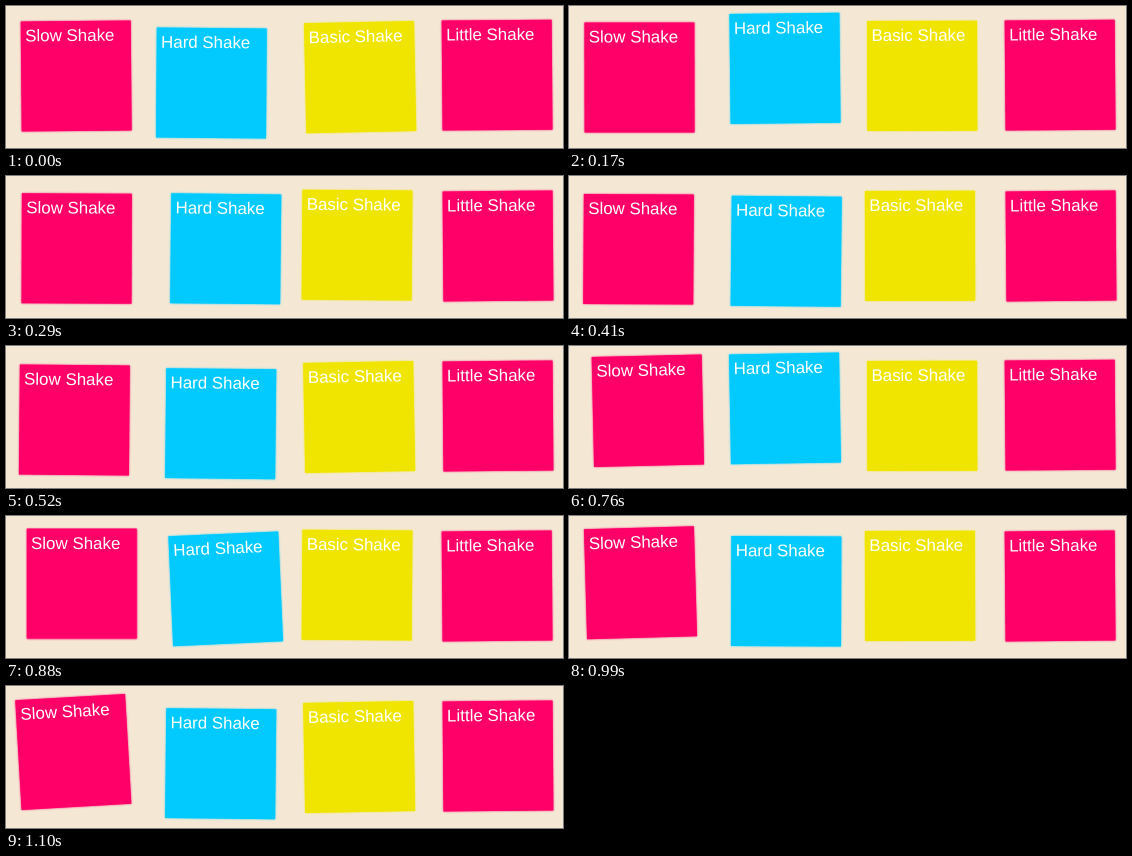
Recreate the animation shown at these times as an HTML page. Size 557x142 px, loop 1150 ms.

```html
<!DOCTYPE html>
<html lang="en">
<head>
<meta charset="utf-8">
<title>Shake</title>
<style>
  html, body {
    margin: 0;
    width: 100%;
    height: 100%;
    overflow: hidden;
    background: #f4e8d5;
  }
  .box {
    --fill: #ff0068;
    position: absolute;
    left: -55px;
    top: -55px;
    box-sizing: border-box;
    width: 110px;
    height: 110px;
    padding: 4.8px 4.4px;
    color: #fff;
    background: var(--fill);
    box-shadow: 0 0 2px var(--fill);
    font: 16.9px "Liberation Sans", Arial, sans-serif;
    text-rendering: geometricPrecision;
    white-space: nowrap;
  }
  .blue { --fill: #02caff; }
  .yellow { --fill: #f0e500; }
</style>
</head>
<body>
<div class="box">Slow Shake</div>
<div class="box blue">Hard Shake</div>
<div class="box yellow">Basic Shake</div>
<div class="box">Little Shake</div>
<script>
  const LOOP = 1150;
  const STEPS = 20;
  const CYCLE = 10;  // steps after which the faster shakes repeat

  // Key points: step, centre x, centre y, degrees.
  const slowPath = [
    [0, 70.2, 70, -.5], [5, 70.7, 72.5, .2], [9, 68.4, 74, .5],
    [11, 82, 62, -2.5], [15, 75.7, 67.5, 0], [19, 67.3, 66, -3.3]
  ];
  const hardPath = [
    [0, 205.4, 77, .4], [1, 213.8, 62.3, .5], [3, 216, 62.4, -.6],
    [5, 219.7, 72.8, .6], [9, 214.7, 77.7, .6]
  ];

  const wave = turns => Math.cos(turns * 2 * Math.PI);

  function along(path, step) {
    const next = path.findIndex(point => point[0] >= step);
    const b = path[next];
    const a = path[Math.max(next - 1, 0)];
    const mix = (step - a[0]) / (b[0] - a[0] || 1);
    return a.map((value, i) => value + (b[i] - value) * mix).slice(1);
  }

  // Every second beat is knocked off its path.
  function rattle(pose, step, size) {
    if (step % 2) return pose;
    return pose.map((value, i) =>
      value + Math.sin(step * (2.3 + i)) * size * (i < 2 ? 1 : .3));
  }

  function slow(step) {
    return rattle(along(slowPath, step), step, 1);
  }

  function hard(step) {
    const [x, y, angle] = along(hardPath, step % CYCLE);
    const twist = 3.1 * Math.exp(-((step - 15) ** 2) / 2);
    return rattle([x, y, angle - twist], step, 5);
  }

  function basic(step) {
    const turns = step / CYCLE;
    const pose = [
      352.6 + 1.9 * wave(turns - .1),
      70.2 + wave(turns),
      -.4 - .8 * wave(turns)
    ];
    return rattle(pose, step, 1);
  }

  function little(step) {
    const right = wave((step - 7.6) / 14.5) > 0;
    const down = step % CYCLE >= CYCLE / 2;
    return [right ? 492 : 491.1, down ? 70 : 69.1, -.45];
  }

  const boxes = document.querySelectorAll(".box");
  const shakes = [slow, hard, basic, little];
  const begin = performance.now();

  function draw() {
    const time = (performance.now() - begin) % LOOP;
    const step = Math.floor((time + 3) / LOOP * STEPS) % STEPS;
    shakes.forEach((shake, i) => {
      const [x, y, angle] = shake(step);
      boxes[i].style.transform = `translate(${x}px, ${y}px) rotate(${angle}deg)`;
    });
    requestAnimationFrame(draw);
  }
  draw();
</script>
</body>
</html>
```
